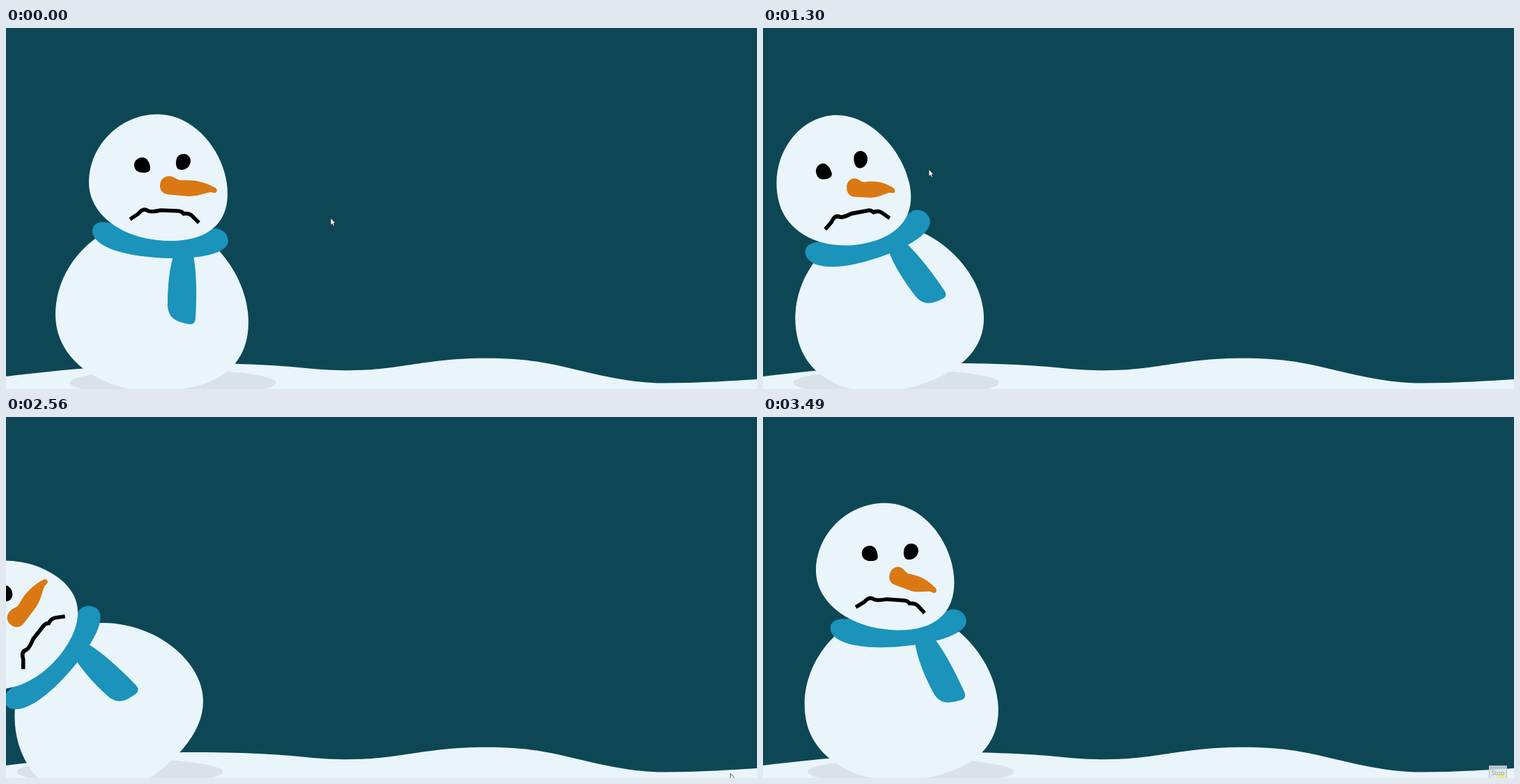
These frames come from a looping animation (1078x519 px, 3540 ms). An HTML page:

```html
<!DOCTYPE html>
<html lang="en">
<meta charset="utf-8">
<title>Wobbly snowman</title>
<style>
  html, body { margin: 0; width: 100%; height: 100%; overflow: hidden; background: #0d4755; }
  svg { display: block; width: 1078px; height: 519px; }
  .snow { fill: #e9f5fa; }
  .scarf { fill: #1b93ba; }
  text { font: 9px "Open Sans", sans-serif; fill: #8d979c; }
</style>
<svg viewBox="0 0 1078 519">
  <path class="snow" d="M0 501C90 490 190 482 270 482C340 482 390 485 430 489C520 498 560 486 610 480C660 473 720 473 765 480C820 489 870 508 935 510.5C985 511 1030 508 1078 505V519H0Z"/>
  <ellipse id="shadow" cy="510" rx="148" ry="19" fill="#d9e2e8"/>
  <path id="body" class="snow" d="M71 412C71 338 136 275 212 274C283 274 348 350 348 423C348 487 302 522 212 522C140 522 71 480 71 412Z"/>
  <path id="tail" class="scarf" d="M242 322C234 345 232 372 232 399C233 420 249 423 263 426Q271 427 272 418C274 385 274 350 268 322Z"/>
  <path id="band" class="scarf" d="M140 279C128 279 124 285 124 293C126 313 165 330 240 331C295 331 319 320 319 306C318 295 311 289 300 288C250 300 190 285 140 279Z"/>
  <g id="head">
    <path class="snow" d="M119 222C119 168 165 124 217 124C275 124 318 185 318 238C318 287 282 306 236 306C170 306 119 270 119 222Z"/>
    <path d="M184 197C184 190 190 186 196 186C203 186 207 195 207 202C207 206 203 208 197 208C189 208 184 204 184 197Z"/>
    <path d="M244 194C244 186 248 181 255 181C261 181 265 186 265 191C265 198 259 204 252 204C246 204 244 200 244 194Z"/>
    <path fill="none" stroke="#000" stroke-width="5.5" d="M178 275L190 267Q197 258 204 263Q209 265 222 262L247 263Q252 263 255 267Q263 266 267 270L277 280"/>
  </g>
  <path id="nose" fill="#da7814" d="M221 227C221 218 227 213 234 213C242 213 245 219 252 219C275 217 290 224 301 230Q304 233 302 236Q300 238 294 236C283 238 275 242 262 242L234 239.5C226 239 221 234 221 227Z"/>
  <g id="stop">
    <rect x="1042.5" y="501.5" width="25" height="20" fill="#dde5e8" fill-opacity=".8" stroke="#b3c1c7"/>
    <text x="1055" y="514.5" text-anchor="middle">Stop</text>
    <circle cx="1060" cy="523" r="8" fill="#f5e67a"/>
  </g>
  <circle id="press" cx="237.5" cy="202.5" r="8.5" fill="#ff0" fill-opacity=".52"/>
  <g id="cursor" stroke="#222" stroke-width=".8">
    <path id="arrow" fill="#fff" d="M0 0V10.5L2.3 8.4L4 12L5.6 11.2L4 7.8H7Z"/>
    <path id="hand" fill="#fff8c0" d="M0 .5Q1-.5 2 .5V5L6 5.6Q7.2 6 7 8L6 12.5H1.5L-2.5 7.5Q-2 6-.2 7.5Z"/>
  </g>
</svg>
<script>
const LOOP = 3540, STEP = 60;
const $ = id => document.getElementById(id);

// time, lean of the whole figure, extra tilt of the head (degrees), stretch
const moves = [
  [0, 0, 0, 0], [480, 0, 10, 0], [960, -3, 11.6, .04], [1500, -39.5, 4.5, .05],
  [1650, -50.5, 0, .05], [2040, -58.6, -3.2, .05], [2940, -40.7, 0, 0], [3480, -8.2, 10.2, 0]
];
// time, x, y of the pointer
const trail = [[0, 466, 273], [480, 340, 254], [800, 238, 203], [1700, 238, 203],
  [2040, 987, 449], [2650, 1047, 521]];

// Smooth curve through uneven keys
function curve(keys, t) {
  const last = keys.length - 1;
  const i = Math.min(last - 1, keys.findLastIndex(k => k[0] <= t));
  const a = keys[i], b = keys[i + 1], span = b[0] - a[0];
  const u = Math.min(1, (t - a[0]) / span);
  const slope = (j, c) => {
    const p = keys[Math.max(0, j - 1)], q = keys[Math.min(last, j + 1)];
    return (q[c] - p[c]) / (q[0] - p[0]) * span;
  };
  return a.slice(1).map((v, n) => {
    const c = n + 1, d = b[c] - v, m0 = slope(i, c), m1 = slope(i + 1, c);
    return v + u * (m0 + u * (3 * d - 2 * m0 - m1 + u * (m0 + m1 - 2 * d)));
  });
}

// Ease from key to key, stopping at each
function glide(keys, t) {
  const i = keys.findLastIndex(k => k[0] <= t);
  const a = keys[i], b = keys[i + 1] || a;
  const u = (t - a[0]) / (b[0] - a[0] || 1), e = a === b ? 0 : u * u * (3 - 2 * u);
  return a.slice(1).map((v, n) => v + (b[n + 1] - v) * e);
}

const bump = (t, mid, width) => Math.exp(-(((t - mid) / width) ** 2));
const show = (id, on) => $(id).setAttribute("visibility", on ? "visible" : "hidden");

// Put the part's own pivot at the given point
function place(id, [x, y], turn, sx, sy, px, py) {
  $(id).setAttribute("transform",
    `translate(${x} ${y}) rotate(${turn}) scale(${sx} ${sy}) translate(${-px} ${-py})`);
}

// Offset a point by a vector turned by deg
function reach([x, y], dx, dy, deg) {
  const r = deg * Math.PI / 180, c = Math.cos(r), s = Math.sin(r);
  return [x + dx * c - dy * s, y + dx * s + dy * c];
}

function drawSnowman(t) {
  const [lean, look, stretch] = curve(moves, t);
  const sin = Math.sin(lean * Math.PI / 180), cos = Math.cos(lean * Math.PI / 180);
  const sx = 1 - 1.1 * stretch, sy = 1 + stretch, size = 1 - .6 * stretch;
  const hop = 13 * bump(t, 640, 90) + 15 * bump(t, 3350, 70);

  const core = [210 + 88 * sin, 400 + 48 * (1 - cos)];
  const neck = reach(core, 12 * sy, -101.5 * sy - hop * .6, lean);
  const face = reach(core, 14.5 * sy, -205.3 * sy - hop, lean);
  const tilt = lean + look;
  const [nx, ny] = reach(face, 9.5 * sx, 31.3 * sy, tilt);

  $("shadow").setAttribute("cx", 239.5 - 88 * Math.max(0, -sin) ** .6);
  place("body", core, lean * .72, size, size, 210, 400);
  place("band", neck, lean, sx, sy, 222, 298.5);
  place("tail", reach(neck, 37, 28.5, lean), lean - 1.9 * look, sx, 1, 259, 327);
  place("head", face, tilt, sx, sy, 224.5, 194.7);
  place("nose", [nx + look * .2, ny + look * .2], lean + 2.2 * look,
    sx * (1 - .013 * look), 1, 234, 226);
}

function drawPointer(t) {
  const over = t > 600 && t < 1250;
  place("cursor", glide(trail, t), 0, 1, 1, 0, 0);
  show("arrow", !over && t < 2650);
  show("hand", over);
  show("press", t >= 900 && t < 1150);
  show("stop", t >= 3300);
}

const begin = performance.now();
function frame() {
  const time = (performance.now() - begin) % LOOP;
  const t = Math.floor(time / STEP) * STEP;
  drawSnowman(t);
  drawPointer(t);
  requestAnimationFrame(frame);
}
frame();
</script>
</html>
```
